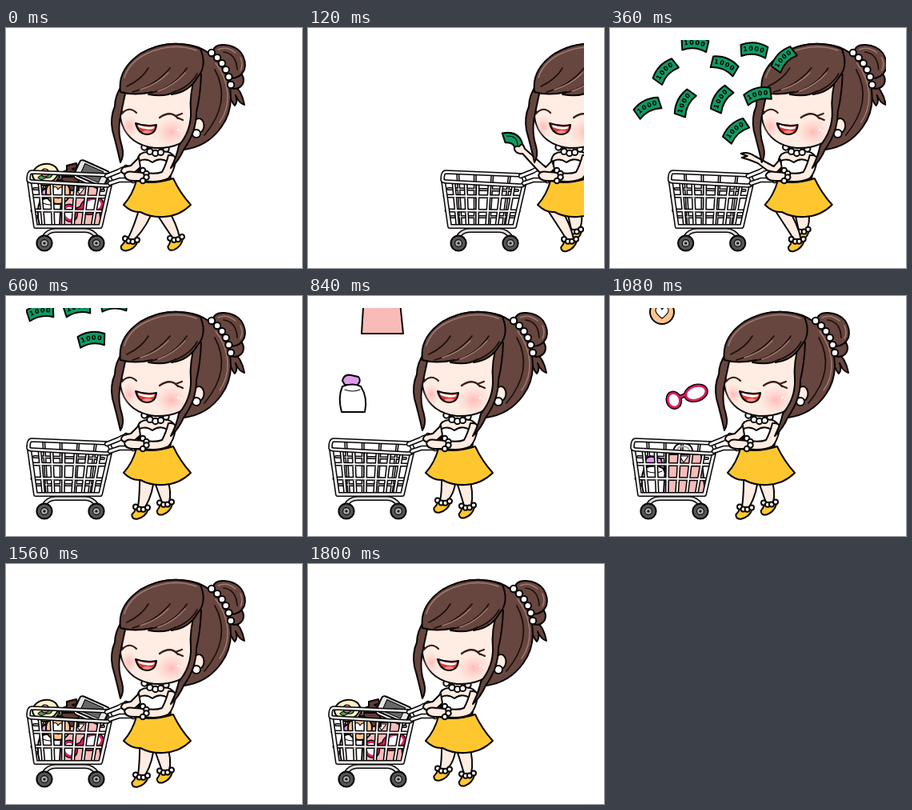
Write an HTML page that moves like this. It is 370x300 px and loops after 1.92 s.

```html
<!DOCTYPE html>
<html lang="en">
<head>
<meta charset="utf-8">
<title>Shopping spree</title>
<style>
  html, body { margin: 0; width: 100%; height: 100%; overflow: hidden; background: #fff; }
  svg { display: block; width: 370px; height: 300px; }
  .ink { stroke: #080404; stroke-width: 2; stroke-linejoin: round; stroke-linecap: round; }
  .thin { stroke-width: 1.1; }
  .line { fill: none; }
  .skin { fill: #ffece2; }
  .hair { fill: #66463f; }
  .yellow { fill: #ffc72f; }
  .white { fill: #fff; }
  .shine { fill: none; stroke: #a07a70; stroke-width: 1.5; stroke-linecap: round; }
  .strand { fill: none; stroke: #1d0f0d; stroke-width: 1.7; stroke-linecap: round; }
  .tube { fill: none; stroke-linecap: round; stroke-linejoin: round; }
  text { font: bold 8px "DejaVu Sans", sans-serif; letter-spacing: 1px; text-anchor: middle; }
</style>
</head>
<body>
<svg viewBox="0 0 370 300">
  <defs>
    <clipPath id="stage"><rect x="25" y="15" width="320" height="270"/></clipPath>
    <radialGradient id="blush">
      <stop offset="0" stop-color="#ffabac" stop-opacity=".75"/>
      <stop offset="1" stop-color="#ffc4be" stop-opacity="0"/>
    </radialGradient>
    <path id="curve" d="M-18 5Q0-3 18 5"/>
    <g id="bill">
      <path class="ink" fill="#0f9a63" d="M-17-5Q0-13 17-5L15 9Q0 2-15 9Z"/>
      <text><textPath href="#curve" startOffset="50%">1000</textPath></text>
    </g>
    <g id="bottle" class="ink">
      <path fill="#dd9bea" d="M-13-19Q-11-28-2-26L7-24Q11-19 6-14H-10Z"/>
      <path class="white" d="M-13-12Q0-17 10-12Q19 2 15 20H-14Q-19 2-13-12Z"/>
      <path class="line thin" d="M-10-8Q0-4 9-8"/>
    </g>
    <g id="bag" class="ink">
      <path class="line" d="M-13-20Q-14-36-1-36Q13-36 11-20"/>
      <path class="line" style="stroke:#aaa" d="M-9-20Q-10-32-1-32Q9-32 8-20"/>
      <path fill="#f9bbb7" d="M-22-22H22L27 27H-25Z"/>
      <path class="white thin" d="M-5-20L0-12L6-20Z"/>
    </g>
    <g id="glasses" transform="rotate(-18)">
      <g id="frame" class="ink line" style="stroke-width:5.5">
        <ellipse cx="-17" rx="7.5" ry="9"/>
        <ellipse cx="12" rx="13" ry="8.5"/>
        <path d="M-9-1L-1-2"/>
      </g>
      <g class="line" stroke="#d91a62" stroke-width="2.8">
        <ellipse cx="-17" rx="7.5" ry="9" fill="#fff"/>
        <ellipse cx="12" rx="13" ry="8.5" fill="#fff"/>
        <path d="M-9-1L-1-2"/>
      </g>
    </g>
    <g id="pump" class="ink" fill="#5d3b33">
      <path d="M-3-9L9-12L10-6L4-5L10-2L9 5H-9L-8-1L-3-3Z"/>
      <path d="M-9 5H11L12 22H-11Z"/>
    </g>
    <g id="compact" class="ink">
      <circle fill="#ffc48e" r="15"/>
      <path class="white thin" d="M0 8Q-12-1-6-6Q-2-8 0-3Q3-8 7-5Q11 0 0 8Z"/>
    </g>
    <g id="phone" class="ink">
      <g transform="rotate(24)">
        <rect class="white" x="-20" y="-9" width="41" height="22" rx="5"/>
        <rect fill="#e6e6e6" x="-20" y="-12" width="40" height="21" rx="4"/>
        <rect class="thin" fill="#66676a" x="-13" y="-9" width="25" height="15"/>
      </g>
    </g>
    <g id="rose" class="ink">
      <g transform="rotate(-12)">
        <ellipse fill="#e3cd8c" cx="1" cy="3" rx="16" ry="12"/>
        <ellipse fill="#fdf3c6" rx="16" ry="12"/>
        <path class="thin" fill="#4c9b62" d="M-10 3Q-5-1 0 4Q6-1 9 2Q6 8 0 5Q-7 9-10 3Z"/>
        <circle class="thin" fill="#e6778a" cy="-1" r="5"/>
      </g>
    </g>
  </defs>

  <g clip-path="url(#stage)">
    <g id="scene">
      <g id="cartBack"></g>
      <g id="items"></g>
      <g id="cart"></g>
      <g id="legs"></g>

      <g class="ink">
        <path class="hair" d="M282 68Q295 78 298 96Q291 94 287 84Q290 92 286 97Q280 90 278 78Z"/>
        <circle class="hair" cx="286" cy="65" r="11"/>
        <path class="hair" d="M258 32Q259 20 273 21Q287 22 294 31Q301 42 298 52Q293 63 281 63Q268 58 258 32Z"/>
        <path class="strand" d="M272 30Q288 32 289 52"/>
        <path class="shine" d="M265 27Q276 22 287 31M293 37Q297 46 293 53"/>
        <path class="hair" d="M147 82Q144 45 176 28Q205 14 240 24Q269 36 278 66Q287 99 269 124Q252 148 223 152Q200 120 147 82Z"/>
        <path class="strand" d="M261 52Q283 92 248 134"/>
        <path class="shine" d="M262 44Q275 60 277 82Q278 103 267 118"/>
      </g>

      <g class="ink">
        <path class="skin" d="M178 143L177 155Q166 155 164 165L166 190H205L210 161Q207 155 198 154L199 143Z"/>
        <path class="white" d="M167 166Q175 162 183 168Q192 161 202 167L203 192H166Z"/>
        <path class="yellow" d="M163 191Q185 196 209 188Q218 207 231 221Q217 235 197 236Q181 237 168 230Q157 231 147 221Q158 209 163 191Z"/>
      </g>
      <g id="farArm" class="ink"></g>
      <path class="ink skin" d="M203 159Q213 158 212 166Q210 180 203 188Q190 194 172 191L159 191Q149 191 148 184Q150 178 160 180L174 181Q188 183 195 180Q200 171 203 159Z"/>
      <g id="jewels" class="ink white"></g>

      <g class="ink">
        <path class="skin" d="M145 76Q140 106 145 120Q154 146 186 150Q222 151 234 128L240 68Z"/>
        <ellipse class="skin" cx="241" cy="122" rx="6.5" ry="9"/>
        <circle class="white" cx="238" cy="132" r="5"/>
      </g>
      <ellipse cx="154" cy="123" rx="11" ry="14" fill="url(#blush)"/>
      <ellipse cx="207" cy="130" rx="21" ry="18" fill="url(#blush)"/>
      <path class="line" stroke="#3a1d18" stroke-width="2.2" stroke-linecap="round" d="M145 107Q154 97 163 106M192 112Q206 102 215 113M212 110L220 107M214 112L221 115M146 105L142 101"/>
      <path class="ink" fill="#e03a38" d="M162 119Q176 124 188 121Q187 133 176 133Q165 132 162 119Z"/>
      <path class="white" d="M165 121Q176 125 186 123L184 126Q175 128 166 124Z"/>
      <path fill="#ff9087" d="M170 130Q177 126 183 130Q176 134 170 130Z"/>
      <path class="line" stroke="#fff" stroke-width="1.6" d="M214 128L217 126M218 130L220 128"/>

      <g class="ink">
        <path class="hair" d="M146 70Q136 84 136 98Q130 112 133 128Q138 146 143 168Q148 160 145 148Q140 134 142 116Q145 100 149 82Z"/>
        <path class="hair" d="M237 56Q229 84 231 104Q232 128 216 147Q213 162 206 175Q216 166 222 152Q238 130 238 105Q243 84 244 58Z"/>
        <path class="hair" d="M143 80Q139 52 168 32Q206 11 243 26Q252 48 239 62Q229 80 207 83L212 79Q200 87 178 83L183 80Q160 85 143 80Z"/>
      </g>
      <path class="strand" d="M239 57Q229 76 201 83M226 50Q210 75 178 82M205 50Q187 72 158 80M178 50Q170 64 151 73"/>
      <path class="shine" d="M224 56Q210 72 190 79M203 56Q190 70 168 77M148 62Q154 43 174 33Q207 17 238 28"/>
      <g id="hairPearls" class="ink white"></g>
    </g>
    <g id="bills"></g>
  </g>
</svg>
<script>
const $ = id => document.getElementById(id);
const STEP = 120, COUNT = 16, ARRIVED = 4;
const mix = (a, b, k) => a + (b - a) * k;
const range = n => [...Array(n).keys()];

const tube = (d, w, fill = '#f6f6f6') =>
  `<path class="tube" d="${d}" stroke="#080404" stroke-width="${w}"/>` +
  `<path class="tube" d="${d}" stroke="${fill}" stroke-width="${w - 3}"/>`;
const place = (id, x, y, turn = 0) =>
  `<use href="#${id}" transform="translate(${x} ${y}) rotate(${turn})"/>`;

// Pearls spaced evenly along a quadratic curve
const pearls = (n, r, a, b, c) => range(n).map(i => {
  const k = i / (n - 1);
  const at = j => mix(mix(a[j], b[j], k), mix(b[j], c[j], k), k);
  return `<circle cx="${at(0)}" cy="${at(1)}" r="${r}"/>`;
}).join('');

// Cart
const wheel = x => `<circle class="ink" cx="${x}" cy="269" r="9.6" fill="#555"/>
  <circle class="ink thin" cx="${x}" cy="269" r="4.4" fill="#aaa"/>
  <circle cx="${x}" cy="269" r="1.6"/>`;
const slats = (n, top) => range(n).map(i => {
  const k = (i + 0.8) / (n + 0.6);
  return `M${mix(30, 129, k)} ${top + 4 * k}L${mix(37, 118, k)} 247`;
}).join('');
$('cartBack').innerHTML = tube(slats(4, 182) + 'M35 201L122 203M38 236H118', 4);
$('cart').innerHTML =
  tube(slats(6, 193) + 'M31 210L126 211M33 228L123 229', 5) +
  tube('M47 262Q52 253 62 253H99Q108 253 114 262', 6, '#ddd') +
  tube('M29 191L37 248H118L130 196', 6) +
  tube('M32 180Q28 180 28 190Q29 192 33 192L125 197Q131 197 131 191L128 184Z', 5.6) +
  tube('M126 185L141 179Q148 174 156 175M130 194L142 190H156', 6.4) +
  tube('M150 174Q160 178 159 191', 6.4) + wheel(48) + wheel(113);

// Jewellery
$('jewels').innerHTML =
  pearls(5, 3.7, [173, 149], [187, 163], [200, 151]) +
  pearls(4, 3.3, [171, 178], [181, 184], [171, 191]);
$('hairPearls').innerHTML = pearls(6, 4.2, [257, 31], [276, 45], [281, 71]);

// Legs
const anklet = pearls(4, 3, [-7, 0], [0, 6], [8, 0]);
const leg = (hip, x, y) => {
  const knee = (hip + x) / 2 + 3;
  return `<path class="ink skin" d="M${hip - 9} 224Q${knee - 8} 246 ${x - 4} ${y}H${x + 5}Q${knee + 9} 246 ${hip + 9} 224Z"/>
    <g class="ink" transform="translate(${x} ${y}) rotate(${(184 - x) / 4})">
      <path class="yellow" d="M-6 1Q-8 7-11 10Q-11 16-4 15Q6 12 9 2Z"/>
      <g class="white">${anklet}</g></g>`;
};
// She hops with her feet together while rolling in, then walks in place
function legs(n) {
  const hop = n > 0 && n < ARRIVED;
  const a = n * Math.PI / 2, swing = Math.sin(a);
  const mid = hop ? 190 : 184;
  const gap = hop ? 3 : 28 * Math.cos(a) + 15 * swing * swing;
  const lift = hop ? 10 : 4 * Math.max(0, swing);
  return leg(192, mid + gap, 262 - lift) +
    leg(hop ? 166 : 176, mid - gap, 264 - (hop ? 0 : 8 * Math.max(0, -swing)));
}

// Far arm
const limb = d => `<path class="skin" d="${d}"/>`;
const arms = {
  hold: limb('M166 162Q160 168 156 172L147 174Q141 179 147 182L160 181L168 174Z'),
  cash: `<g transform="translate(115 138) rotate(58)">
      <path fill="#0f9a63" d="M-12 7Q-4-13 14-7L13 4Q5 0 0 10Z"/>
      <path class="line thin" d="M-6 4Q0-7 10-2"/></g>` +
    limb('M165 166L157 174L131 151Q128 142 124 148Q117 147 118 152Q121 158 128 157L149 180L160 184L168 176Z'),
  toss: limb('M166 164L158 173L134 160Q125 154 117 157L125 160L118 162L128 165L138 169L150 178L161 181L168 174Z')
};

// Goods drop one after another at a steady speed until they rest in the cart
const good = (id, x, rest, start) => ({id, x, rest, start});
const goods = [
  good('bottle', 56, 227, 6),
  good('bag', 92, 220, 7),
  good('pump', 79, 181, 9.3),
  good('glasses', 96, 226, 8),
  good('compact', 65, 205, 9),
  good('rose', 49, 182, 10),
  good('phone', 107, 183, 11)
];
const drawGoods = n => goods.map(({id, x, rest, start}) =>
  place(id, x, Math.min(rest, 20 + 105 * (n - start)))).join('');

// Banknotes burst from the hand into two loose rows, then drift up and left
const notes = [
  ...range(5).map(i => ({
    x: 69 + 37 * i,
    y: 35 + 19 * Math.cos(Math.PI * i) * (1 - i / 5),
    turn: 22 - 17 * (i - 2) ** 2
  })),
  ...range(4).map(i => ({
    x: 47 + 46 * i, y: 99 - 5 * i, turn: -66 + 20 * (i - 1.4) ** 2
  })),
  {x: 157, y: 128, turn: -42}
];
const drawNotes = n => n < 2 || n > 5 ? '' : notes.map(({x, y, turn}) => {
  const burst = Math.min(1, (n - 1) / 2), drift = Math.max(0, n - 3);
  return place('bill', mix(208, x, burst) - 25 * drift,
    mix(125, y, burst) - 37 * drift, turn * (1 - 0.42 * drift));
}).join('');

let shown = -1;
function draw(n) {
  const slide = n ? Math.max(0, ARRIVED - n) * 46.7 : 0;
  $('scene').setAttribute('transform', `translate(${slide} 0)`);
  $('legs').innerHTML = legs(n);
  $('farArm').innerHTML = arms[n === 1 ? 'cash' : n > 1 && n <= ARRIVED ? 'toss' : 'hold'];
  $('items').innerHTML = drawGoods(n || COUNT);
  $('bills').innerHTML = drawNotes(n);
}
function tick() {
  const n = Math.floor(performance.now() / STEP) % COUNT;
  if (n !== shown) draw(shown = n);
  requestAnimationFrame(tick);
}
tick();
</script>
</body>
</html>
```
